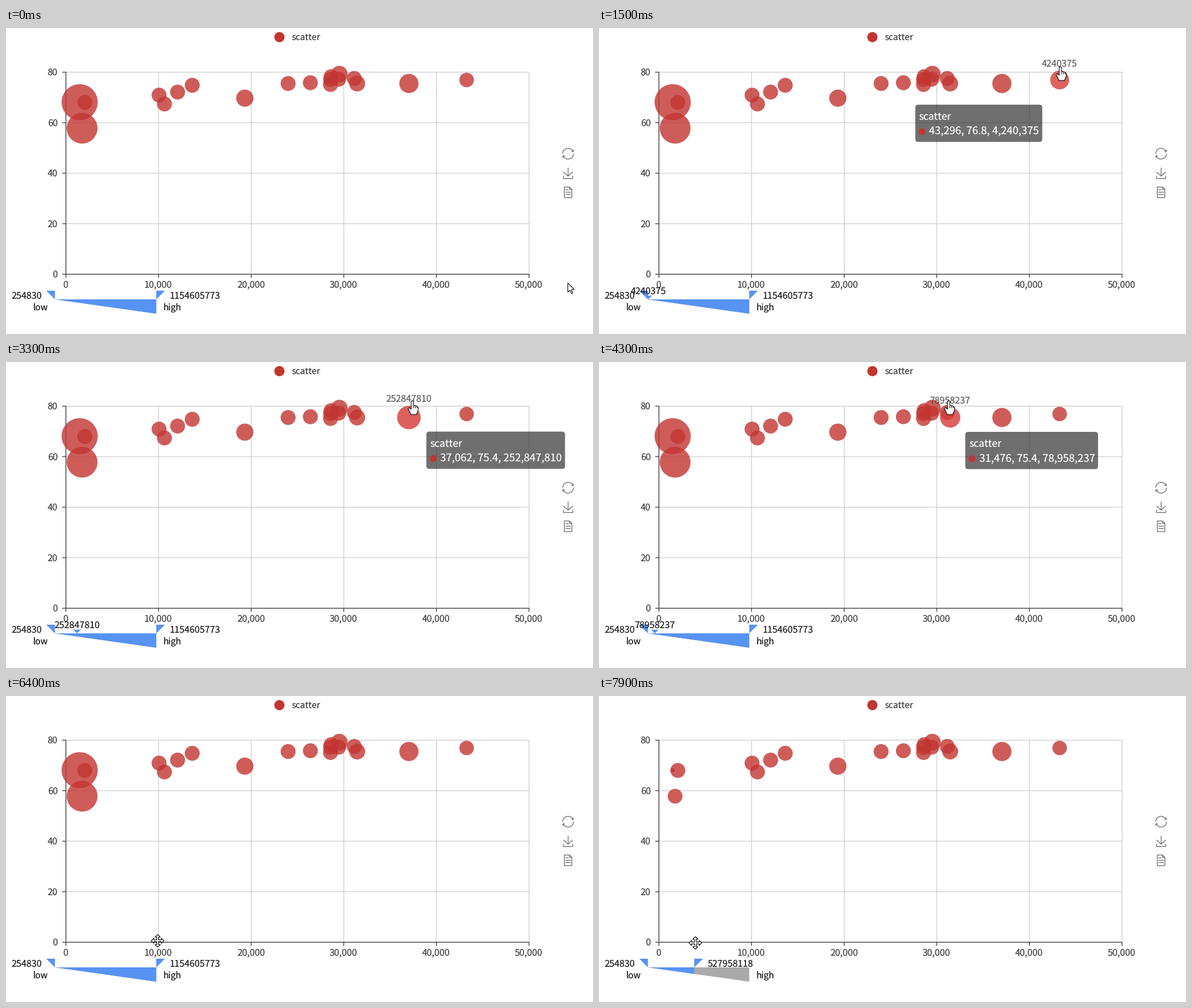
Recreate the animation shown at these times as a matplotlib script. Size 1014 by 530 pixels, loop 8 s.

```python
import matplotlib.pyplot as plt
import numpy as np
from matplotlib.animation import FuncAnimation
from matplotlib.patches import Circle, FancyBboxPatch, Polygon

W, H, DPI = 1014, 530, 64
PT = 72 / DPI  # points per pixel
FRAMES, STEP_MS = 80, 100
DRAG = 64  # frame in which the slider is grabbed

RED, HOT, BLUE, GREY = "#c23531", "#d53a36", "#5793f3", "#aaaaaa"
DARK, GRID, INK, SOFT = "#333333", "#cccccc", "#1c1c1c", "#404040"

plt.rcParams["font.family"] = ["Noto Sans CJK JP", "DejaVu Sans"]
plt.rcParams["text.hinting"] = "none"
plt.rcParams["path.snap"] = False
plt.rcParams["toolbar"] = "None"

# income, life expectancy
POINTS = [
    (28604, 77), (31163, 77.4), (1516, 68), (13670, 74.7), (28599, 75),
    (29476, 77.1), (31476, 75.4), (28666, 78.1), (1777, 57.7), (29550, 79.1),
    (2076, 67.9), (12087, 72), (24021, 75.4), (43296, 76.8), (10088, 70.8),
    (19349, 69.6), (10670, 67.3), (26424, 75.7), (37062, 75.4),
]
# populations that stand out; the others are close to TYPICAL
PEOPLE = {2: 1154605773, 8: 870601776, 18: 252847810, 15: 147568552,
          9: 122249285, 6: 78958237, 13: 4240375}
TYPICAL = 26000000
LOW, HIGH = 254830, 1154605773

# point, first hovered frame, first frame after
HOVERS = [(13, 13, 27), (18, 30, 37), (6, 39, 46), (9, 46, 49)]

# frame, x, y of the pointer tip
STOPS = np.array([
    (0, 970, 441), (13, 797, 67), (21, 797, 67), (26, 788, 66), (30, 707, 66),
    (33, 702, 67), (35, 702, 67), (39, 612, 67), (42, 604, 67), (44, 604, 67),
    (48, 562, 70), (53, 215, 152), (56, 105, 380), (60, 262, 424),
])

ARROW = [(0.5, 0.5), (0.5, 16.5), (4.2, 13.2), (6.6, 18.8), (9, 17.8),
         (6.6, 12.2), (11.6, 11.8)]
HAND = [(-2, 15), (-2, 1), (0, 0), (2, 1), (2, 8), (8, 9.5), (10, 12),
        (10, 17), (7, 24), (-2.5, 24), (-7.5, 13.5), (-5, 12)]
MOVE_ARM = np.array([(-1.5, -1.5), (-1.5, -6.5), (-4.5, -6.5), (0, -11),
                     (4.5, -6.5), (1.5, -6.5)])

fig = plt.figure(figsize=(W / DPI, H / DPI), dpi=DPI, facecolor="white")
ax = fig.add_axes([0, 0, 1, 1])
ax.set_xlim(0, W)
ax.set_ylim(H, 0)
ax.axis("off")


def line(xs, ys, color, width=1.25, z=1):
    return ax.plot(xs, ys, color=color, lw=width * PT, zorder=z,
                   solid_capstyle="butt", solid_joinstyle="miter")[0]


def text(x, y, s, size=15.8, color=SOFT, ha="left", z=5, alpha=1):
    """Place text so that its digits are centred on y."""
    return ax.text(x, y + 0.36 * size, s, fontsize=size * PT, color=color,
                   ha=ha, va="baseline", zorder=z, alpha=alpha)


def circle(x, y, r, color, z, alpha=1):
    return ax.add_patch(Circle((x, y), r, fc=color, lw=0, alpha=alpha, zorder=z))


def shape(points, fill, z=4, edge="none", width=0):
    return ax.add_patch(Polygon(points, closed=True, fc=fill, ec=edge,
                                lw=width * PT, zorder=z))


def px(income):
    return 103 + income * 0.016


def py(life):
    return 426 - life * 4.375


def people(n):
    return PEOPLE.get(n, TYPICAL)


def share(value):
    return (value - LOW) / (HIGH - LOW)


def slider_share(i):
    """Upper end of the slider, which moves in steps of 1/140."""
    k = max(i - DRAG, 0) / (FRAMES - 1 - DRAG)
    return np.rint(140 - 76 * k ** 1.33) / 140


def pointer(i):
    x, y = (np.interp(i, STOPS[:, 0], STOPS[:, c]) for c in (1, 2))
    if i > DRAG:
        x, y = 86.5 + 175 * slider_share(i), y + 0.25 * (i - DRAG)
    return np.array([x, y])


def elastic_out(k):
    if k <= 0:
        return 0
    if k >= 1:
        return 1
    return 1 + 2 ** (-10 * k) * np.sin((k - 0.1) * 2 * np.pi / 0.4)


def hovered_at(i, linger=0):
    """The hovered point, or the one left at most `linger` frames ago."""
    found = [n for n, start, end in HOVERS if start <= i < end + linger]
    return found[-1] if found else None


def tip_label(n):
    income, life = POINTS[n]
    return f"{income:,}, {life}, {people(n):,}"


def tip_width(n):
    label = tip_label(n)
    digits = sum(c.isdigit() for c in label)
    marks = sum(c in ",." for c in label)
    return 29.3 + 18.2 * (0.555 * digits + 0.278 * marks + 0.224 * 2)


def tooltip_path():
    """The box chases a spot beside the pointer, on the left near the edge."""
    spot = target = np.array([503.0, 252.0])
    path = []
    for i in range(FRAMES):
        spot = spot + 0.7 * (target - spot)
        n = hovered_at(i)
        if n is not None:
            x, y = pointer(i)
            width = tip_width(n)
            left = x + 27 if x + 27 + width < W else x - 27 - width
            target = np.array([left, y + 54])
        path.append(spot)
    return path


TOOLTIP = tooltip_path()


def draw_toolbox():
    def stroke(cx, cy, *points):
        xs, ys = np.array(points).T
        line(cx + xs, cy + ys, "#666666", z=4)

    x, y = 971, 217.7
    arc = np.radians(np.linspace(-20, -180, 40))
    for s in (1, -1):
        line(x + s * 9.3 * np.cos(arc), y + s * 9.3 * np.sin(arc), "#666666", z=4)
        stroke(x, y, (s * 5.7, s * -3.7), (s * 9, s * -3.7), (s * 9, s * -7.1))

    y = 251.3
    stroke(x, y, (-8.1, -2), (0, 5.3), (8.1, -2))
    stroke(x, y, (-8, 4.7), (-8, 9.4), (8, 9.4), (8, 4.7))
    stroke(x, y, (0, 5.2), (0, -9.4))

    y = 284.6
    stroke(x, y, (2.4, -9.2), (-6.5, -9.2), (-6.5, 9.2), (6.5, 9.2),
           (6.5, -5.1), (2.4, -9.2), (2.4, -5.1), (6.5, -5.1))
    for dy, right in ((-4.3, 0.6), (-0.2, 4.7), (3.9, 4.7)):
        stroke(x, y, (-4.5, dy), (right, dy))


def draw_static():
    for v in range(0, 50001, 10000):
        x = px(v) + 0.5
        line([x, x], [76.5, 426.5], GRID)
        line([x, x], [426.5, 432.7], DARK, z=1.5)
        text(x - 0.3, 444.5, f"{v:,}", ha="center")
    for v in range(0, 81, 20):
        y = py(v) + 0.5
        line([103.5, 903.5], [y, y], GRID)
        line([97.2, 103.5], [y, y], DARK, z=1.5)
        text(89.3, y, str(v), ha="right")
    line([103.5, 103.5], [76, 427], DARK, z=1.5)
    line([103, 904], [426.5, 426.5], DARK, z=1.5)

    circle(472.3, 15.8, 8.8, RED, 4)
    text(494, 16.4, "scatter", 15.3)
    draw_toolbox()

    shape([(84.5, 470), (259.5, 470), (259.5, 494.8)], GREY, 3)
    shape([(69.5, 455), (84.5, 455), (84.5, 470)], BLUE)
    text(62.5, 463.5, str(LOW), color=INK, ha="right")
    text(72.5, 483.5, "low", 15.3, INK, ha="right")
    text(272, 483.5, "high", 15.3, INK)


def draw_slider(i):
    top = slider_share(i)
    x = 84.5 + 175 * top
    value = round(LOW + top * (HIGH - LOW))
    return [
        shape([(84.5, 470), (x, 470), (x, 470 + 24.8 * top)], BLUE),
        shape([(x, 455), (x + 15, 455), (x, 470)], BLUE),
        text(x + 22.8, 463.5, str(int(value)), color=INK),
    ]


def swell(n, i):
    """Extra radius of a point while, and just after, it is hovered."""
    for index, start, end in HOVERS:
        if index == n and start <= i < end + 4:
            if i < end:
                return 3.75 * elastic_out((i - start) / 4)
            return 3.75 * (1 - elastic_out((i - end) / 4))
    return 0


def decay(i):
    k = i - DRAG
    return np.exp(0.005 * k * k - 0.22 * k)


def radius(n, i):
    part = share(people(n))
    r = 12.5 + 18.75 * part + swell(n, i)
    if slider_share(i) < part:  # out of range: shrink since it left
        last = max(f for f in range(DRAG, i) if slider_share(f) >= part)
        r *= decay(i) / decay(last)
    return r


def draw_points(i):
    parts = []
    hovered = hovered_at(i)
    for n, (income, life) in enumerate(POINTS):
        x, y, r = px(income), py(life), radius(n, i)
        parts.append(circle(x, y, r, HOT if n == hovered else RED, 2, 0.8))
        if n == hovered:
            label = str(people(n))
            bx = 84.5 + 175 * share(people(n))
            parts += [
                text(x, y - r - 12.2, label, ha="center", alpha=0.85),
                shape([(bx - 6.5, 463.5), (bx + 6.5, 463.5), (bx, 470)],
                      BLUE, 4.5),
                text(bx, 455.5, label, color=INK, ha="center"),
            ]
    return parts


def draw_tooltip(i):
    n = hovered_at(i, linger=2)
    if n is None:
        return []
    x, y = TOOLTIP[i]
    box = FancyBboxPatch((x, y), tip_width(n), 64.5, fc="#323232", alpha=0.7,
                         lw=0, boxstyle="round,pad=0,rounding_size=5", zorder=7)
    return [
        ax.add_patch(box),
        text(x + 6.5, y + 19.8, "scatter", 17.3, "white", z=8),
        circle(x + 11.8, y + 46.7, 5.8, RED, 8),
        text(x + 24, y + 45.5, tip_label(n), 18.2, "white", z=8),
    ]


def draw_pointer(i):
    x, y = pointer(i)
    if hovered_at(i) is not None:
        parts = [shape(np.add(HAND, (x, y)), "white", 9, "black", 1.1)]
        for dx in (2, 5.2, 8.2):
            parts.append(line([x + dx] * 2, [y + 8 + dx / 5, y + 13],
                              "black", 1, 10))
        return parts
    outline = ARROW
    if i >= STOPS[-1, 0]:
        arm, outline = MOVE_ARM, []
        for _ in range(4):
            outline.extend(arm)
            arm = np.column_stack((-arm[:, 1], arm[:, 0]))
    return [shape(np.add(outline, (x, y)), "white", 9, "black", 1.1)]


moving = []


def update(i):
    while moving:
        moving.pop().remove()
    for draw in (draw_points, draw_slider, draw_tooltip, draw_pointer):
        moving.extend(draw(i))
    return moving


draw_static()
anim = FuncAnimation(fig, update, frames=FRAMES, interval=STEP_MS,
                     init_func=lambda: [], repeat=True, repeat_delay=0)
plt.show()
```
